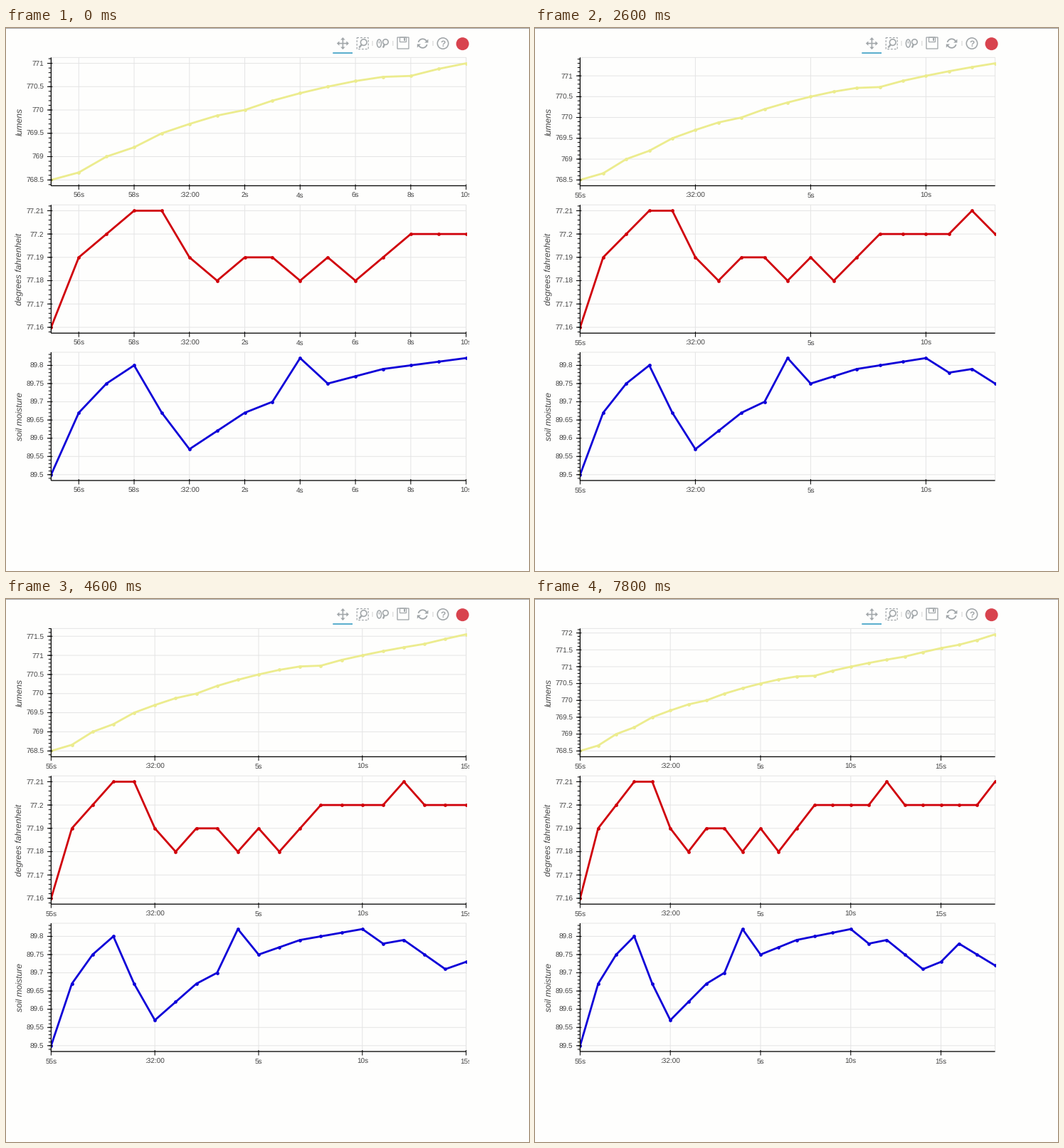
A matplotlib script for the animation above (8000 ms loop, 735 px wide and 762 px high).

```python
import numpy as np
import matplotlib.pyplot as plt
from matplotlib.animation import FuncAnimation
from matplotlib.patches import Arc, Circle, Ellipse, Polygon, Rectangle
from matplotlib.transforms import Bbox, TransformedBbox

W, H, DPI = 735, 762, 100
STEP_MS, LOOP_MS = 100, 8000
PT = 72 / DPI  # points per pixel

BG, GRID, TEXT, ICON = "#fefefd", "#e5e5e5", "#444444", "#a1a6a9"
LEFT, RIGHT, PLOT_H = 63.4, 646.6, 180
LABEL_EDGE = 651
AXIS_W = 1.25

START_SEC, FIRST_COUNT = 55, 16
UPDATES = [500, 1500, 2600, 3500, 4600, 5600, 6700, 7800]
LATE_UPDATES = [t + 100 if t == 3500 else t for t in UPDATES]

LUMENS = 768 + np.array([
    50, 66, 100, 120, 150, 170, 188, 200, 220, 236, 250, 262,
    271, 273, 288, 300, 311, 321, 330, 343, 355, 365, 379, 396]) / 100
DEGREES = 77 + np.array([
    16, 19, 20, 21, 21, 19, 18, 19, 19, 18, 19, 18,
    19, 20, 20, 20, 20, 21, 20, 20, 20, 20, 20, 21]) / 100
MOISTURE = 89 + np.array([
    50, 67, 75, 80, 67, 57, 62, 67, 70, 82, 75, 77,
    79, 80, 81, 82, 78, 79, 75, 71, 73, 78, 75, 72]) / 100

# Unsnapped paths keep the soft, sub-pixel placed lines of a scaled page.
plt.rcParams.update({"font.family": "Liberation Sans", "path.snap": False,
                     "text.hinting": "no_hinting"})
fig = plt.figure(figsize=(W / DPI, H / DPI), dpi=DPI, facecolor=BG)
ax = fig.add_axes([0, 0, 1, 1])
ax.set_xlim(0, W)
ax.set_ylim(H, 0)
ax.set_autoscale_on(False)
ax.axis("off")
label_clip = TransformedBbox(
    Bbox.from_extents(0, 0, LABEL_EDGE / DPI, H / DPI), fig.dpi_scale_trans)


def stroke(xs, ys, color, width, **kw):
    kw.setdefault("solid_capstyle", "butt")
    return ax.plot(xs, ys, color=color, lw=width * PT, **kw)[0]


def write(x, y, s, size, color=TEXT, **kw):
    return ax.text(x, y, s, fontsize=size * PT, color=color,
                   va="baseline", zorder=5, **kw)


def outline(shape, width=1.5, color=ICON):
    shape.set(fill=False, edgecolor=color, linewidth=width * PT)
    return ax.add_patch(shape)


def solid(shape, color=ICON):
    shape.set(facecolor=color, edgecolor="none")
    return ax.add_patch(shape)


def multiples(lo, hi, step):
    return np.arange(np.ceil(lo / step - 1e-6),
                     np.floor(hi / step + 1e-6) + 1) * step


def number(v):
    return f"{v:.2f}".rstrip("0").rstrip(".")


def clock(sec):
    return ":32:00" if sec == 60 else f"{sec % 60}s"


class Panel:
    def __init__(self, top, title, data, color, step, updates):
        self.top, self.bottom = top, top + PLOT_H
        self.data, self.color, self.step = data, color, step
        self.updates = updates
        self.count, self.artists = None, []
        # Negative height keeps the clip box upright on the flipped y axis.
        self.frame = outline(Rectangle((LEFT, self.bottom), RIGHT - LEFT,
                                       -PLOT_H), 1, GRID)
        stroke([LEFT, LEFT], [top, self.bottom], "black", AXIS_W, zorder=4)
        stroke([LEFT, RIGHT], [self.bottom] * 2, "black", AXIS_W, zorder=4)
        write(22.7, top + PLOT_H / 2, title, 12.15, style="italic",
              rotation=90, rotation_mode="anchor", ha="center")

    def show(self, ms):
        count = FIRST_COUNT + sum(ms >= t for t in self.updates)
        if count == self.count:
            return
        for artist in self.artists:
            artist.remove()
        self.count = count
        self.artists = [*self.x_axis(), *self.y_axis(), self.curve()]

    def x_pos(self, i):
        return LEFT + i * (RIGHT - LEFT) / (self.count - 1)

    def y_range(self):
        values = self.data[:self.count]
        pad = 0.05 * np.ptp(values)
        return values.min() - pad, values.max() + pad

    def y_pos(self, v):
        lo, hi = self.y_range()
        return self.bottom - (v - lo) / (hi - lo) * PLOT_H

    def x_axis(self):
        step = 2 if self.count <= 18 else 5
        secs = [s for s in range(START_SEC, START_SEC + self.count)
                if s % step == 0]
        xs = [self.x_pos(s - START_SEC) for s in secs]
        yield ax.vlines(xs, self.top, self.bottom, color=GRID, lw=PT, zorder=1)
        yield ax.vlines(xs, self.bottom - 2, self.bottom + 5.5,
                        color="black", lw=PT, zorder=4)
        for x, s in zip(xs, secs):
            label = write(x, self.bottom + 16.6, clock(s), 10, ha="center")
            label.set_clip_on(True)
            label.set_clip_box(label_clip)
            yield label

    def y_axis(self):
        lo, hi = self.y_range()
        major = multiples(lo, hi, self.step)
        ys = self.y_pos(major)
        minor = self.y_pos(multiples(lo, hi, self.step / 5))
        yield ax.hlines(ys, LEFT, RIGHT, color=GRID, lw=PT, zorder=1)
        yield ax.hlines(ys, LEFT - 5.5, LEFT + 2, color="black", lw=PT,
                        zorder=4)
        yield ax.hlines(minor, LEFT - 3.6, LEFT, color="black", lw=PT,
                        zorder=4)
        for y, v in zip(ys, major):
            yield write(LEFT - 10, y + 3.6, number(v), 10, ha="right")

    def curve(self):
        line = stroke(self.x_pos(np.arange(self.count)),
                      self.y_pos(self.data[:self.count]), self.color, 2.8,
                      marker="o", ms=4.8 * PT, mew=0, zorder=3,
                      solid_joinstyle="round")
        line.set_clip_path(self.frame)
        return line


def pan_icon(cx, cy):
    for dx, dy in ((1, 0), (-1, 0), (0, 1), (0, -1)):
        stroke([cx, cx + 6 * dx], [cy, cy + 6 * dy], ICON, 1.6)
        tip = np.array([cx + 8.5 * dx, cy + 8.5 * dy])
        base = tip - 3.5 * np.array([dx, dy])
        side = 3.2 * np.array([dy, dx])
        solid(Polygon([tip, base + side, base - side]))


def lens(cx, cy, r, hx, hy):
    outline(Circle((cx, cy), r), 1.6)
    d = np.array([hx - cx, hy - cy])
    sx, sy = np.array([cx, cy]) + r * d / np.hypot(*d)
    stroke([sx, hx], [sy, hy], ICON, 2.3)


def box_zoom_icon(cx, cy):
    box = outline(Rectangle((cx - 8, cy - 8), 16, 16), 1.2)
    box.set_linestyle((0, (2.4, 1.6)))
    lens(cx + 1.5, cy - 1.5, 4.3, cx - 5, cy + 6)


def wheel_zoom_icon(cx, cy):
    outline(Ellipse((cx - 5, cy), 6, 11), 1.5)
    stroke([cx - 5, cx - 5], [cy - 3, cy], ICON, 1.2)
    lens(cx + 4, cy - 2, 3.8, cx + 0.5, cy + 6)


def save_icon(cx, cy):
    outline(Rectangle((cx - 8, cy - 8), 16, 16), 1.3)
    outline(Rectangle((cx - 4.5, cy - 8), 9, 6.5), 1.2)
    solid(Rectangle((cx + 1, cy - 7), 2, 4))


def reset_icon(cx, cy):
    outline(Arc((cx, cy), 12.5, 12.5, theta1=195, theta2=330), 1.8)
    outline(Arc((cx, cy), 12.5, 12.5, theta1=15, theta2=150), 1.8)
    for d in (1, -1):
        solid(Polygon([(cx + 7.8 * d, cy - 6 * d), (cx + 7.8 * d, cy - d),
                       (cx + 2.6 * d, cy - d)]))


def help_icon(cx, cy):
    outline(Circle((cx, cy), 7.7), 1.6)
    write(cx, cy + 4.3, "?", 12, ICON, ha="center", weight="bold")


def toolbar():
    cy = 21.6
    stroke([0, W], [0.5, 0.5], "#a3a3a3", 1)
    pan_icon(473.4, cy)
    box_zoom_icon(501.2, cy)
    wheel_zoom_icon(529.4, cy)
    save_icon(558, cy - 0.5)
    reset_icon(585.6, cy)
    help_icon(614, cy)
    for x in (515, 543.8, 600):
        stroke([x, x], [18, 25], "#d3d3d3", 1)
    stroke([459.3, 487], [35.1, 35.1], "#4aa6c9", 1.8)
    solid(Circle((641.6, 22.2), 9), "#d8434e")


toolbar()
panels = [
    Panel(41.4, "lumens", LUMENS, "#ecec8e", 0.5, UPDATES),
    Panel(248.2, "degrees fahrenheit", DEGREES, "#d0000a", 0.01, UPDATES),
    Panel(455.0, "soil moisture", MOISTURE, "#0e00d8", 0.05, LATE_UPDATES),
]


def update(i):
    for panel in panels:
        panel.show(i * STEP_MS)
    return []


anim = FuncAnimation(fig, update, frames=LOOP_MS // STEP_MS,
                     init_func=lambda: update(0), interval=STEP_MS,
                     repeat=True, repeat_delay=0, blit=False)
plt.show()
```
